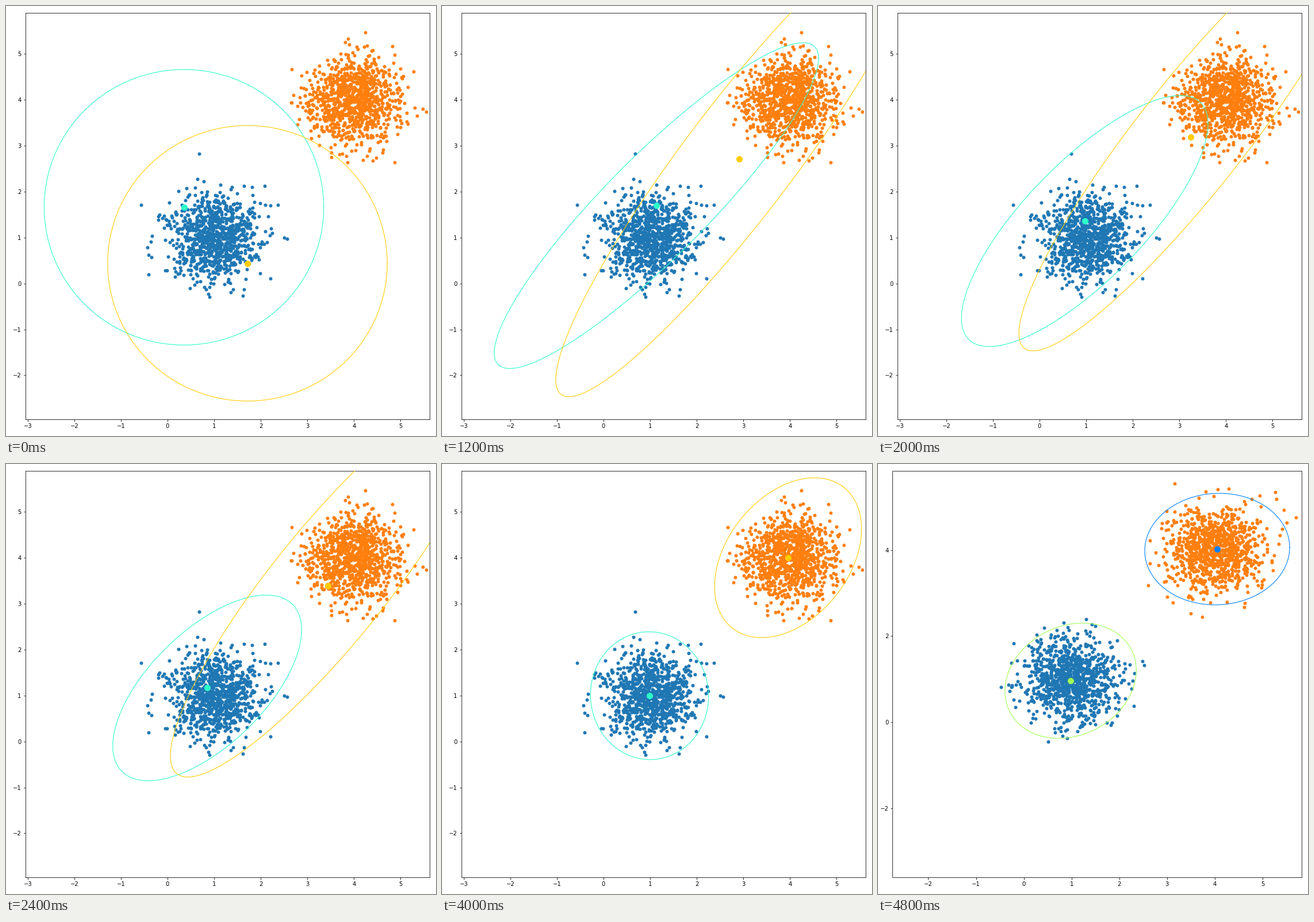
Recreate the animation shown at these times as a matplotlib script. Size 748 by 748 pixels, loop 5200 ms.

```python
import numpy as np
import matplotlib.pyplot as plt
from matplotlib.animation import FuncAnimation

SIZE, DPI = 748, 72
TOP, RIGHT, BOTTOM = 12, 737, 718.5
CLUSTERS = ((1, "#1f77b4"), (4, "#ff7f0e"))
POINTS, SIGMA = 1000, 0.47
TURN = np.linspace(0, 2 * np.pi, 400)
FIRST_RUN, SECOND_RUN = 11, 2

# Key steps of the fit; a state is centre x, centre y, half width, half height, correlation
KEYS = np.array([1, 4, 6, 8, 10])
TEAL = np.array([
    (1.067, 1.874, 3.566, 3.255, 0.876),
    (1.110, 1.568, 3.239, 3.399, 0.870),
    (0.851, 1.167, 2.026, 2.022, 0.625),
    (0.987, 1.035, 1.400, 1.455, 0.130),
    (0.987, 0.998, 1.267, 1.392, -0.01),
])
AMBER = np.array([
    (2.727, 2.162, 3.862, 5.171, 0.917),
    (3.048, 2.964, 3.880, 5.027, 0.926),
    (3.448, 3.395, 3.387, 4.169, 0.890),
    (3.812, 3.752, 2.505, 2.980, 0.724),
    (3.960, 4.003, 1.577, 1.740, 0.360),
])


def circle(cx, cy):
    return cx, cy, 3, 3, 0


def ease(states, step):
    """Cubic Hermite curve through the key states."""
    slopes = np.gradient(states, KEYS, axis=0)
    k = min(np.searchsorted(KEYS, step, side="right"), len(KEYS) - 1) - 1
    span = KEYS[k + 1] - KEYS[k]
    t = (step - KEYS[k]) / span
    blend = t * t * (3 - 2 * t)
    return ((1 - blend) * states[k] + blend * states[k + 1]
            + span * t * (1 - t) * ((1 - t) * slopes[k] - t * slopes[k + 1]))


def path(start, states):
    """Start as a circle, then follow the key states."""
    return lambda step: ease(states, step) if step else circle(*start)


def jump(start, end):
    return lambda step: end if step else circle(*start)


def ellipse(cx, cy, w, h, rho):
    c, s = np.cos(TURN), np.sin(TURN)
    return cx + w * c, cy + h * (rho * c + np.sqrt(1 - rho ** 2) * s)


class Scene:
    """One run of the fit on its own axes; origin and unit are in stage pixels."""

    def __init__(self, fig, left, origin, unit, xticks, yticks, parts, seed):
        self.ax = ax = fig.add_axes([left / SIZE, 1 - BOTTOM / SIZE,
                                     (RIGHT - left) / SIZE, (BOTTOM - TOP) / SIZE])
        rng = np.random.default_rng(seed)
        for centre, color in CLUSTERS:
            ax.plot(*rng.normal(centre, SIGMA, (2, POINTS)), "o", ms=5, mew=1, color=color)
        self.parts = []
        for color, motion in parts:
            line, = ax.plot([], [], color=color, lw=1.1, zorder=3)
            dot, = ax.plot([], [], "o", ms=10, mew=1, color=color, zorder=4)
            self.parts.append((motion, line, dot))
        ax.set(xticks=xticks, yticks=yticks,
               xlim=((left - origin[0]) / unit[0], (RIGHT - origin[0]) / unit[0]),
               ylim=((origin[1] - BOTTOM) / unit[1], (origin[1] - TOP) / unit[1]))

    def show(self, step):
        for motion, line, dot in self.parts:
            state = motion(step)
            line.set_data(*ellipse(*state))
            dot.set_data([state[0]], [state[1]])


plt.rcParams["font.family"] = "DejaVu Sans"
fig = plt.figure(figsize=(SIZE / DPI, SIZE / DPI), dpi=DPI, facecolor="white")
first = Scene(fig, 33.5, (281, 482.7), (81.05, 79.87), range(-3, 6), range(-2, 6),
              [("#2cffca", path((0.352, 1.660), TEAL)),
               ("#ffcc00", path((1.715, 0.440), AMBER))], seed=3)
second = Scene(fig, 25.5, (253.6, 449), (83.07, 74.85), range(-2, 6), range(-2, 5, 2),
               [("#a0ff56", jump((0.644, -0.160), (0.980, 0.962, 1.375, 1.339, 0.18))),
                ("#0080ff", jump((1.600, 1.300), (4.050, 4.021, 1.517, 1.296, 0.03)))], seed=8)


def update(i):
    restarted = i >= FIRST_RUN
    first.ax.set_visible(not restarted)
    second.ax.set_visible(restarted)
    if restarted:
        second.show(i - FIRST_RUN)
    else:
        first.show(i)
    return []


anim = FuncAnimation(fig, update, frames=FIRST_RUN + SECOND_RUN, interval=400,
                     repeat=True, repeat_delay=0, blit=False)
plt.show()
```
